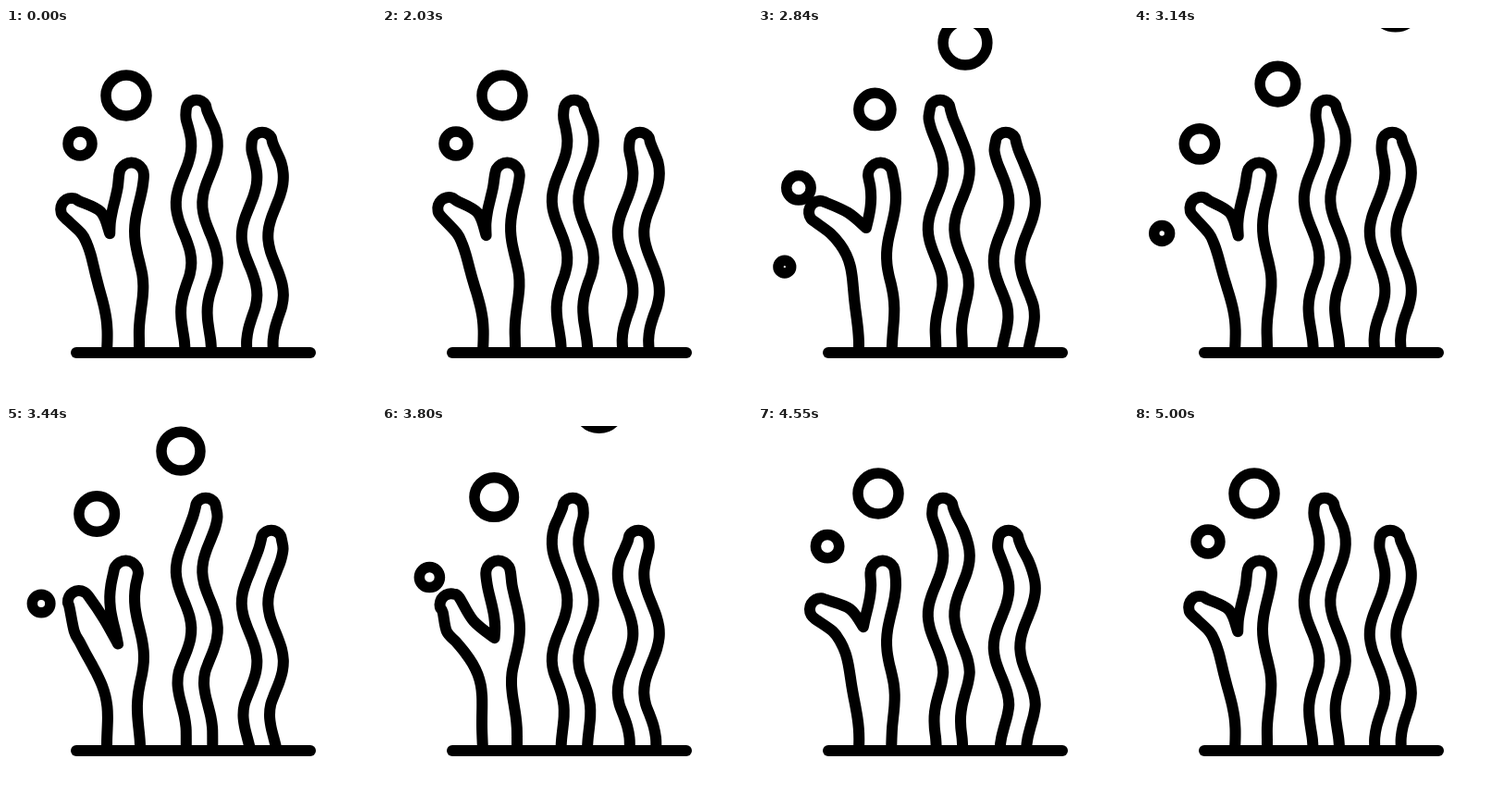
Animation of 400 by 400 pixels, one loop 5.03 s. Source, as an HTML page:

```html
<!DOCTYPE html>
<html lang="en">
<head>
<meta charset="utf-8">
<title>Seaweed and bubbles</title>
<style>
  html, body { margin: 0; width: 100%; height: 100%; overflow: hidden; background: #fff; }
  svg { display: block; width: 100%; height: 100%; }
  path, circle { fill: none; stroke: #000; stroke-linejoin: round; }
  path { stroke-width: 12; }
  #ground { stroke-linecap: round; }
</style>
</head>
<body>
<svg viewBox="0 0 400 400">
  <clipPath id="soil"><path d="M0 0H400V351H0Z"/></clipPath>
  <path id="coral"/>
  <path id="weed"/>
  <g clip-path="url(#soil)"><path id="weed2" transform="translate(71 35)"/></g>
  <path id="ground" d="M76 351H329"/>
  <g id="bubbles"></g>
</svg>
<script>
const LOOP = 5030, REST = 2030, STEP = 30, STEPS = 100;
const WAVE = 127, REST_PHASE = 190, ROOT = 350;
const TAU = 2 * Math.PI;

const $ = id => document.getElementById(id);
const clamp = v => Math.min(1, Math.max(0, v));
const mix = (a, b, t) => a + (b - a) * t;

// How far the current has carried the wave upwards, in pixels.
let shift = 0;
const wave = (y, lag = 0) => -Math.cos(TAU * (y - lag - REST_PHASE + shift) / WAVE);
const beat = at => Math.cos(TAU * (shift / WAVE - at));
const rooted = y => clamp((y - 265) / 75);

// Points (x(y), y) from one height to another.
function edge(x, from, to) {
  const count = Math.max(1, Math.round(Math.abs(to - from) / 12));
  return Array.from({ length: count + 1 }, (_, i) => {
    const y = mix(from, to, i / count);
    return [x(y), y];
  });
}

// Half circle, clockwise, bulging in the given direction.
function cap([x, y], r, dir) {
  return Array.from({ length: 7 }, (_, i) => {
    const a = dir + Math.PI * (i / 6 - 0.5);
    return [x + r * Math.cos(a), y + r * Math.sin(a)];
  });
}

// Catmull-Rom curve through points, as Bezier segments.
function curve(pts) {
  let d = "";
  for (let i = 0; i < pts.length - 1; i++) {
    const a = pts[i], b = pts[i + 1], p = pts[i - 1] || a, n = pts[i + 2] || b;
    const c = [0, 1].map(k => a[k] + (b[k] - p[k]) / 6);
    const e = [0, 1].map(k => b[k] - (n[k] - a[k]) / 6);
    d += "C" + [...c, ...e, ...b].map(v => v.toFixed(2)).join(" ");
  }
  return d;
}

function weedPath() {
  const tip = 89;
  const mid = y => {
    const amp = mix(8.3, 9.6, clamp((112 - y) / 18)) * (1 - 0.85 * rooted(y));
    return 206.3 + 1.5 * rooted(y) + amp * wave(Math.max(y, 94));
  };
  const half = y => mix(11.3, 14.25, clamp((y - tip) / 14));
  const pts = [
    ...edge(y => mid(y) - half(y), ROOT, 98),
    ...cap([mid(tip), tip], 11.3, -Math.PI / 2),
    ...edge(y => mid(y) + half(y), 98, ROOT)
  ];
  return "M" + pts[0] + curve(pts);
}

function coralPath() {
  const outer = y => 144 + rooted(y) + 5 * (1 - 0.8 * rooted(y)) * wave(y, 30);
  const inner = y => outer(y) - 26.8;
  const side = y => {
    const k = (ROOT - y) / 130;
    return 109 - 35 * k ** 3 + 6 * k * wave(y, -36);
  };

  const lean = beat(0.8);
  const tip = [73 - 6 * lean, 194.5 + 4.5 * lean];
  const forkY = 226 + 10 * beat(0.31);
  const fork = [inner(forkY), forkY];
  const arm = cap(tip, 12, Math.atan2(tip[1] - forkY, tip[0] - fork[0] + 14));
  const end = arm[arm.length - 1];
  const bulge = 2 + 7 * beat(0);
  const bend = [(end[0] + fork[0]) / 2 + 0.75 * bulge, (end[1] + forkY) / 2 - 0.65 * bulge];

  const left = [...edge(side, ROOT, 222), ...arm, bend, fork];
  const right = [
    ...edge(inner, forkY, 172),
    ...cap([outer(159) - 13.4, 159], 13.4, -Math.PI / 2),
    ...edge(outer, 172, ROOT)
  ];
  return "M" + left[0] + curve(left) + curve(right);
}

// A bubble that speeds up and leaves through the top.
const leaving = (x, y, r, drift, lift, grow) => step => {
  const n = Math.max(0, step);
  return { x: x + drift * n ** 1.54, y: y - lift * n ** 1.75, r: r + grow * n, w: 11.5 };
};

// A bubble born at the ground that swings left and slows down to its place.
const arriving = (x, y, r, born, life, rise, ease, swing, curl, turn, grow) => step => {
  const m = Math.max(0, 1 - step / life);
  return {
    x: x - swing * m * m * (1 - curl * m ** turn),
    y: y + rise * m ** ease,
    r: r - grow * m * m,
    w: Math.min(11.5, 1.6 * (step - born)),
    hidden: step <= born
  };
};

const bubbles = [
  leaving(130, 73, 22, 0.587, 0.178, 0.07),
  leaving(80, 125, 13, 0.29, 0.116, 0.17),
  arriving(130, 73, 22, 5, 72, 334, 2.57, 270, 1, 3.6, 22.5),
  arriving(80, 125, 13, 9, 100, 262, 2.15, 195, 1.08, 2.4, 11.5)
].map(move => {
  const el = document.createElementNS("http://www.w3.org/2000/svg", "circle");
  $("bubbles").append(el);
  return { el, move };
});

function draw(time) {
  const step = Math.max(-1, Math.floor((time % LOOP - REST) / STEP));
  shift = 2 * WAVE * (1 - (1 - (step + 1) / STEPS) ** 1.53);

  $("coral").setAttribute("d", coralPath());
  const weed = weedPath();
  $("weed").setAttribute("d", weed);
  $("weed2").setAttribute("d", weed);

  for (const { el, move } of bubbles) {
    const { x, y, r, w, hidden } = move(step);
    el.setAttribute("cx", x);
    el.setAttribute("cy", y);
    el.setAttribute("r", Math.max(0, r));
    el.setAttribute("stroke-width", Math.max(0, w));
    el.setAttribute("visibility", hidden ? "hidden" : "visible");
  }
}

const start = performance.now();
function tick() {
  draw(performance.now() - start);
  requestAnimationFrame(tick);
}
tick();
</script>
</body>
</html>
```
